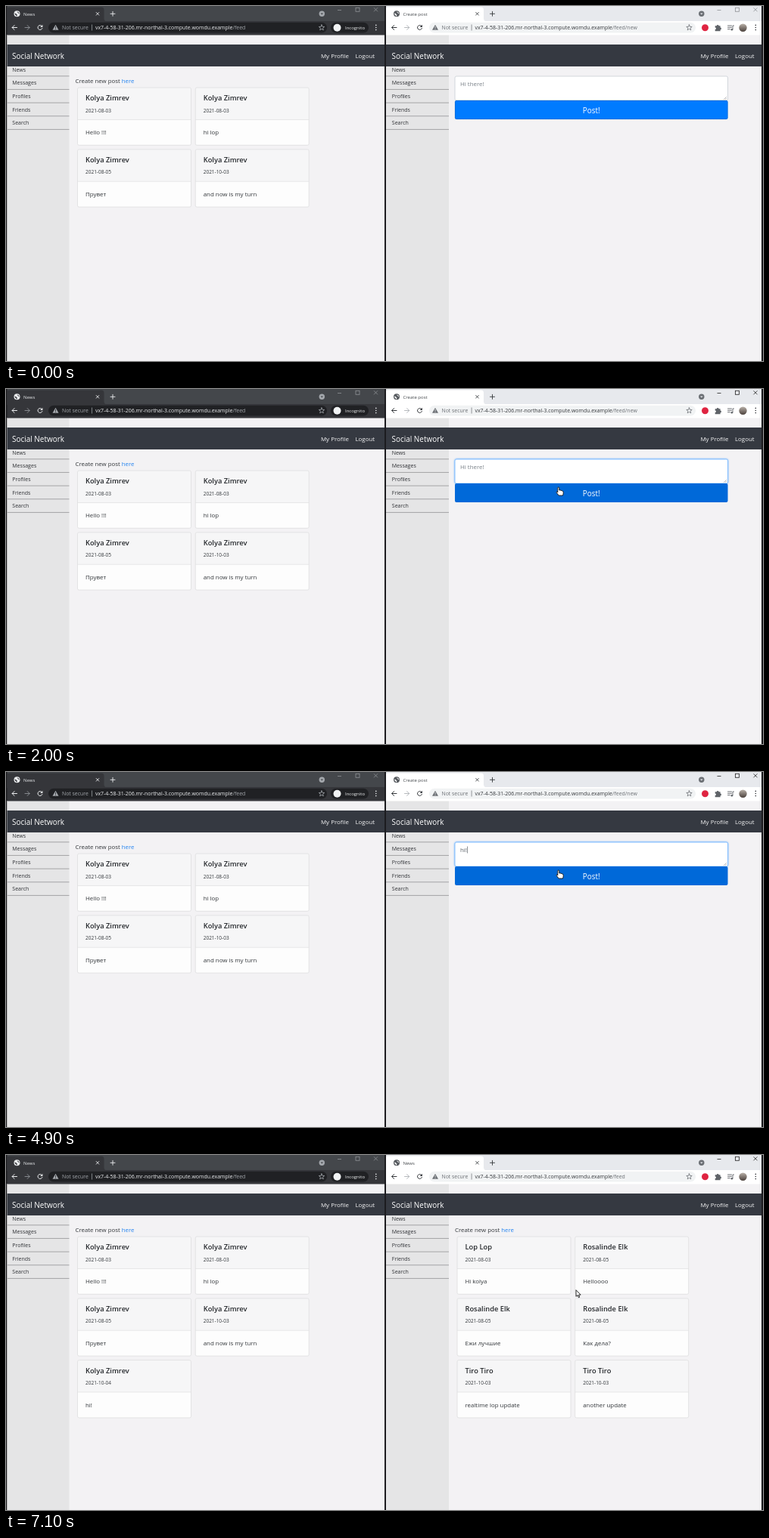
Write an HTML page that moves like this. It is 1000x470 px and loops after 7.2 s.

```html
<!DOCTYPE html>
<html lang="en">
<head>
<meta charset="utf-8">
<title>Two windows</title>
<style>
html, body { margin: 0; width: 100%; height: 100%; overflow: hidden; background: #1c1c1f; }
svg { display: block; width: 1000px; height: 470px; }
text { font-family: "Open Sans", "Noto Sans", sans-serif; white-space: pre; }
.ln { fill: none; stroke-linecap: round; stroke-linejoin: round; }
</style>
</head>
<body>
<svg id="stage" viewBox="0 0 1000 470" xmlns="http://www.w3.org/2000/svg"></svg>
<script>
const LOOP = 7200, STEP = 100;
const T = { focus: 1500, click: 6200, load: 6800 };
const RIGHT = 501.5;
const HOST = 'vx7-4-58-31-206.mr-northal-3.compute.womdu.example';
const KOLYA = 'Kolya Zimrev', ROSA = 'Rosalinde Elk', TIRO = 'Tiro Tiro';

const rect = (x, y, w, h, fill, more = '') =>
  `<rect x="${x}" y="${y}" width="${w}" height="${h}" fill="${fill}" ${more}/>`;
const text = (x, y, size, fill, str, more = '') =>
  `<text x="${x}" y="${y}" font-size="${size}" fill="${fill}" ${more}>${str}</text>`;
const line = (d, color, w = 1, more = '') =>
  `<path class="ln" d="${d}" stroke="${color}" stroke-width="${w}" ${more}/>`;
const shape = (d, fill, more = '') => `<path d="${d}" fill="${fill}" ${more}/>`;
const dot = (x, y, r, fill, more = '') => `<circle cx="${x}" cy="${y}" r="${r}" fill="${fill}" ${more}/>`;
const group = (x, y, body, more = '') => `<g transform="translate(${x} ${y})" ${more}>${body}</g>`;

const globe = (x, ink, land) => group(x, 10.3,
  dot(0, 0, 4, ink) +
  shape('M-3-.8Q-1-.6-.6.6Q.8 1 .2 2.8L-.8 3.2Q-1 1.6-2.4 1.2ZM.2-3Q.4-1.4 1.6-1.2Q2 .2 3.2 0Q3-2.2.2-3Z', land));

const cross = (x, y, r, color, w) =>
  line(`M${x - r} ${y - r}l${2 * r} ${2 * r}m0 ${-2 * r}l${-2 * r} ${2 * r}`, color, w);

function caption(x, color, id) {
  return `<g id="${id}" stroke="${color}" fill="none" stroke-width=".8">
    <path d="M${x} 5.5h5"/><rect x="${x + 24}" y="2.3" width="5" height="5"/>
    <path d="M${x + 48} 2.3l5 5m0-5l-5 5"/></g>`;
}

function star(x, color) {
  let d = '';
  for (let i = 0; i < 10; i++) {
    const r = i % 2 ? 1.7 : 3.9, a = i * Math.PI / 5;
    d += `${i ? 'L' : 'M'}${(x + r * Math.sin(a)).toFixed(2)} ${(28.7 - r * Math.cos(a)).toFixed(2)}`;
  }
  return line(d + 'Z', color, .8);
}

const reload = (x, color) =>
  line(`M${x + 2.4} 26.6A3 3 0 1 0 ${x + 2.9} 29.5`, color, 1) +
  shape(`M${x + 3.4} 24.8v3.2h-3.2Z`, color);

// Browser frame: tab strip, toolbar and address bar
function chrome(c) {
  const pill = c.pill, x = c.dark ? 0 : RIGHT;
  return rect(c.x, 0, c.w, 21, c.strip) +
    shape(`M${c.x} 21V3Q${c.x} 1.5 ${c.x + 3} 1.5H${x + 126}Q${x + 129.5} 1.5 ${x + 129.5} 5V17Q${x + 130} 20 ${x + 133} 20.5Z`, c.bar) +
    rect(c.x, 20, c.w, 18.5, c.bar) +
    cross(x + 121, 10.3, 1.8, c.ink, .9) +
    line(`M${x + 138} 10.3h6m-3-3v6`, c.ink, .9) +
    dot(x + 417.3, 10.3, 3.7, c.soft) +
    shape(`M${x + 415.5} 9.5h3.6l-1.8 2Z`, c.strip) +
    line(`M${x + 14.5} 28.5h-6.4m3-3l-3 3l3 3`, c.ink) +
    line(`M${x + 25} 28.5h6.2m-3-3l3 3l-3 3`, c.dark ? '#85888d' : '#b6b9bd') +
    rect(pill[0], 21.8, pill[1], 13.8, c.field, 'rx="6.9"') +
    shape(`M${x + 65.5} 24.8l4 7h-8Z`, c.soft) +
    line(`M${x + 65.5} 27.3v1.7m0 1.5v.1`, c.field, .8) +
    text(x + 74, 31.2, 6.9, c.soft, 'Not secure') +
    rect(x + 113.2, 24.5, .7, 8, c.soft) +
    text(x + 118, 31.2, 6.95, c.ink, `${HOST}<tspan id="${c.dark ? 'pathL' : 'path'}" fill="${c.soft}">/feed</tspan>`) +
    star(c.star, c.soft) +
    [25.4, 28.5, 31.6].map(y => dot(x + 488.8, y, .8, c.ink)).join('');
}

function pageBase(x, left, w) {
  const items = ['News', 'Messages', 'Profiles', 'Friends', 'Search'];
  return rect(left, 38, w, 432, '#f3f2f4') + rect(left, 38, x + 83.5 - left, 432, '#e5e5e6') +
    items.map((s, i) => text(x + 8.3, 86.8 + 17.65 * i, 7, '#303236', s) +
      rect(left, 92.3 + 17.65 * i, x + 83.5 - left, 1, '#a4a4a6')).join('') +
    rect(left, 51, w, 29, '#353941') +
    text(x + 8, 69.7, 9.95, '#fff', 'Social Network') +
    text(x + 416, 69, 7.9, '#f4f4f5', 'My Profile') +
    text(x + 461.5, 69, 7.9, '#f4f4f5', 'Logout');
}

const invite = x =>
  text(x + 91.5, 102.4, 7.85, '#32363a', 'Create new post <tspan fill="#2484f0">here</tspan>');

function card(x, n, name, date, body) {
  return group(x + 94.5 + 155.7 * (n % 2), 108 + 81.8 * (n >> 1),
    rect(0, 0, 150, 76.3, '#fdfdfd', 'rx="2"') +
    shape('M0 42.3V2Q0 0 2 0H148Q150 0 150 2V42.3Z', '#f6f6f7') +
    rect(0, 42, 150, .7, '#dededf') +
    rect(0, 0, 150, 76.3, 'none', 'rx="2" stroke="#dededf" stroke-width=".8"') +
    text(10.5, 17, 9.3, '#25282c', name, 'font-weight="600"') +
    text(10.5, 32.6, 6.5, '#32363a', date) +
    text(10.5, 62.4, 7.9, '#32363a', body));
}
const cards = (x, list, from = 0) => list.map((c, i) => card(x, i + from, ...c)).join('');

const form =
  rect(593, 93, 360.5, 32, '#fff', 'id="area" rx="2" stroke="#cfd3d8" stroke-width=".9"') +
  line('M948.5 123.5l3-3m-1 3l1-1', '#8c8c8c', .6) +
  text(600, 105.8, 7.9, '#7b8289', 'Hi there!', 'id="entry"') +
  rect(600, 98.5, .7, 9, '#555b61', 'id="caret"') +
  rect(592, 124, 362.5, 27, 'none', 'id="glow" rx="3" stroke="#007bff" stroke-width="2" stroke-opacity=".5"') +
  rect(593, 125, 360.5, 25, '#007bff', 'id="button" rx="2"') +
  rect(593.3, 125.3, 359.9, 24.4, 'none', 'id="dots" rx="2" stroke="#0b4f9d" stroke-width=".7" stroke-dasharray="1 1"') +
  text(773.2, 141.7, 10, '#fff', 'Post!', 'text-anchor="middle"');

const leftWindow =
  pageBase(0, 1.5, 498.5) +
  chrome({ dark: 1, x: 1.5, w: 498.5, strip: '#44474b', bar: '#35363a', ink: '#eceef0', soft: '#a4a8ad',
    field: '#202124', pill: [56, 368], star: 417 }) +
  globe(14.5, '#eceef0', '#35363a') + text(23, 12.5, 6, '#e4e6e8', 'News') + reload(45, '#eceef0') +
  caption(438, '#8f9296', 'capL') +
  rect(429, 21.8, 50, 13.8, '#202124', 'rx="6.9"') + dot(437.5, 28.7, 5, '#f1f3f4') +
  text(448, 30.9, 6, '#f1f3f4', 'Incognito', 'font-weight="500"') +
  invite(0) +
  cards(0, [
    [KOLYA, '2021-08-03', 'Hello !!!'],
    [KOLYA, '2021-08-03', 'hi lop'],
    [KOLYA, '2021-08-05', 'Прувет'],
    [KOLYA, '2021-10-03', 'and now is my turn']]) +
  `<g id="fresh">${card(0, 4, KOLYA, '2021-10-04', 'hi!')}</g>`;

const rightWindow =
  pageBase(RIGHT, 502, 496) +
  chrome({ x: 502, w: 496, strip: '#e7e9ed', bar: '#fff', ink: '#35383c', soft: '#6b6f74',
    field: '#f1f3f4', pill: [559, 352], star: 902.5 }) +
  `<g id="tabIcon">${globe(516, '#55595e', '#fff')}</g>` +
  line('M516 6.8A3.5 3.5 0 0 1 519.5 10.3', '#a9adb2', .9, 'id="spin"') +
  text(524.5, 12.5, 6, '#44484c', 'Create post', 'id="tab"') +
  `<g id="again">${reload(546.5, '#35383c')}</g><g id="stop">${cross(546.5, 28.6, 2.6, '#35383c', 1)}</g>` +
  caption(939.5, '#8f9296', 'capR') +
  dot(923.5, 28.7, 4.5, '#df2441') +
  shape('M936.7 26.3h2.1a1.4 1.4 0 1 1 2.8 0h2v2.3a1.4 1.4 0 1 1 0 2.8v1.8h-6.9v-2.1a1.3 1.3 0 1 0 0-2.6Z', '#5f6368') +
  line('M953.5 26h5m-5 2.3h5m-5 2.3h2.8M960 31v-5h1.5', '#5f6368', .9, 'stroke-linecap="butt"') +
  dot(958.8, 31.2, 1.3, '#5f6368') +
  dot(973.5, 28.7, 5.2, 'url(#face)') +
  `<g id="form">${form}</g><g id="feed">${invite(RIGHT)}` +
  cards(RIGHT, [
    ['Lop Lop', '2021-08-03', 'Hi kolya'],
    [ROSA, '2021-08-05', 'Helloooo'],
    [ROSA, '2021-08-05', 'Ежи лучшие'],
    [ROSA, '2021-08-05', 'Как дела?'],
    [TIRO, '2021-10-03', 'realtime lop update'],
    [TIRO, '2021-10-03', 'another update']]) + '</g>';

const pointer = (id, d) => shape(d, '#fff', `id="${id}" stroke="#111" stroke-width=".9" stroke-linejoin="round"`);
const mouse = `<g id="mouse">` +
  pointer('hand', 'M-1 1Q-1 0 0 0T1 1V4Q3 3.6 3.2 4.4Q5 4 5.2 5.2Q6.4 5 6.4 6.4V8Q6.4 9.5 5.6 11H.4Q-1 9-2.4 7.4Q-3.2 6.2-2.2 6T-1 7Z') +
  pointer('arrow', 'M0 0V8.6L2 6.8L3.4 10L4.8 9.4L3.5 6.4H6.2Z') +
  line('M-1.5-4.5h3m-1.5 0v9m-1.5 0h3', '#222', .8, 'id="beam"') + '</g>';

const stage = document.getElementById('stage');
stage.innerHTML = `<defs><linearGradient id="face" x2="0" y2="1">
  <stop stop-color="#b9b0a8"/><stop offset="1" stop-color="#4c423d"/></linearGradient></defs>` +
  rect(0, 0, 1000, 470, '#1c1c1f') + leftWindow + rightWindow + mouse;

const ui = {};
stage.querySelectorAll('[id]').forEach(n => ui[n.id] = n);
const show = (node, on) => node.setAttribute('display', on ? 'inline' : 'none');
const set = (node, attrs) => { for (const k in attrs) node.setAttribute(k, attrs[k]); };
const put = (node, str) => { if (node.textContent !== str) node.textContent = str; };

const route = [[800, 693, 475], [1200, 686.5, 141], [1400, 688, 107], [1650, 690, 107],
  [1950, 729.8, 130], [6700, 729.8, 130], [7100, 753, 178.7]];
function mouseAt(t) {
  let i = 0;
  while (i < route.length - 2 && t >= route[i + 1][0]) i++;
  const [a, x, y] = route[i], [b, u, v] = route[i + 1];
  let k = Math.max(0, Math.min(1, (t - a) / (b - a)));
  k = i ? k * k * (3 - 2 * k) : 1 - (1 - k) ** 2;
  return [x + (u - x) * k, y + (v - y) * k];
}

const blinks = [T.focus, 1800, 2100, 2400, 2700, 3000, 3300, 3500, 3700, 4000, 4100, 4600, 4900, 5200, 5700, 6000];
const caretOn = t => t < T.click && blinks.filter(b => b <= t).length % 2 === 1;

function draw(t) {
  const done = t >= T.load, loading = t >= T.click && !done;
  const focus = t >= T.focus && t < T.click;
  const [x, y] = mouseAt(t);
  const onButton = !done && y >= 125 && y < 150;
  const onArea = !done && y >= 93 && y < 125;

  show(ui.form, !done);
  show(ui.feed, done);
  show(ui.fresh, done);
  show(ui.tabIcon, !loading);
  show(ui.spin, loading);
  show(ui.again, !loading);
  show(ui.stop, loading);
  set(ui.spin, { transform: `rotate(${(t - 6400) * .6 - 60} 516 10.3)` });
  put(ui.tab, done ? 'News' : 'Create post');
  put(ui.path, done ? '/feed' : '/feed/new');
  set(ui.capR, { stroke: t < T.focus ? '#8f9296' : '#222' });

  const typed = t < 4000 ? '' : t < 4200 ? 'h!' : 'hi!';
  put(ui.entry, typed || 'Hi there!');
  set(ui.entry, { fill: typed ? '#5b6269' : '#7b8289' });
  show(ui.caret, caretOn(t));
  set(ui.caret, { x: 600 + (typed ? ui.entry.getComputedTextLength() + .4 : 0) });
  set(ui.area, { stroke: focus ? '#80bdff' : '#cfd3d8',
    style: focus ? 'filter:drop-shadow(0 0 1.2px #007bff99)' : '' });
  set(ui.button, { fill: onButton && t > 1200 ? '#0069d9' : '#007bff' });
  show(ui.glow, loading);
  show(ui.dots, t < T.focus || loading);

  show(ui.mouse, t >= 800);
  set(ui.mouse, { transform: `translate(${x.toFixed(2)} ${y.toFixed(2)})` });
  show(ui.hand, onButton);
  show(ui.beam, onArea);
  show(ui.arrow, !onButton && !onArea);
}

function tick() {
  draw(Math.floor(performance.now() % LOOP / STEP) * STEP);
  requestAnimationFrame(tick);
}
tick();
</script>
</body>
</html>
```
